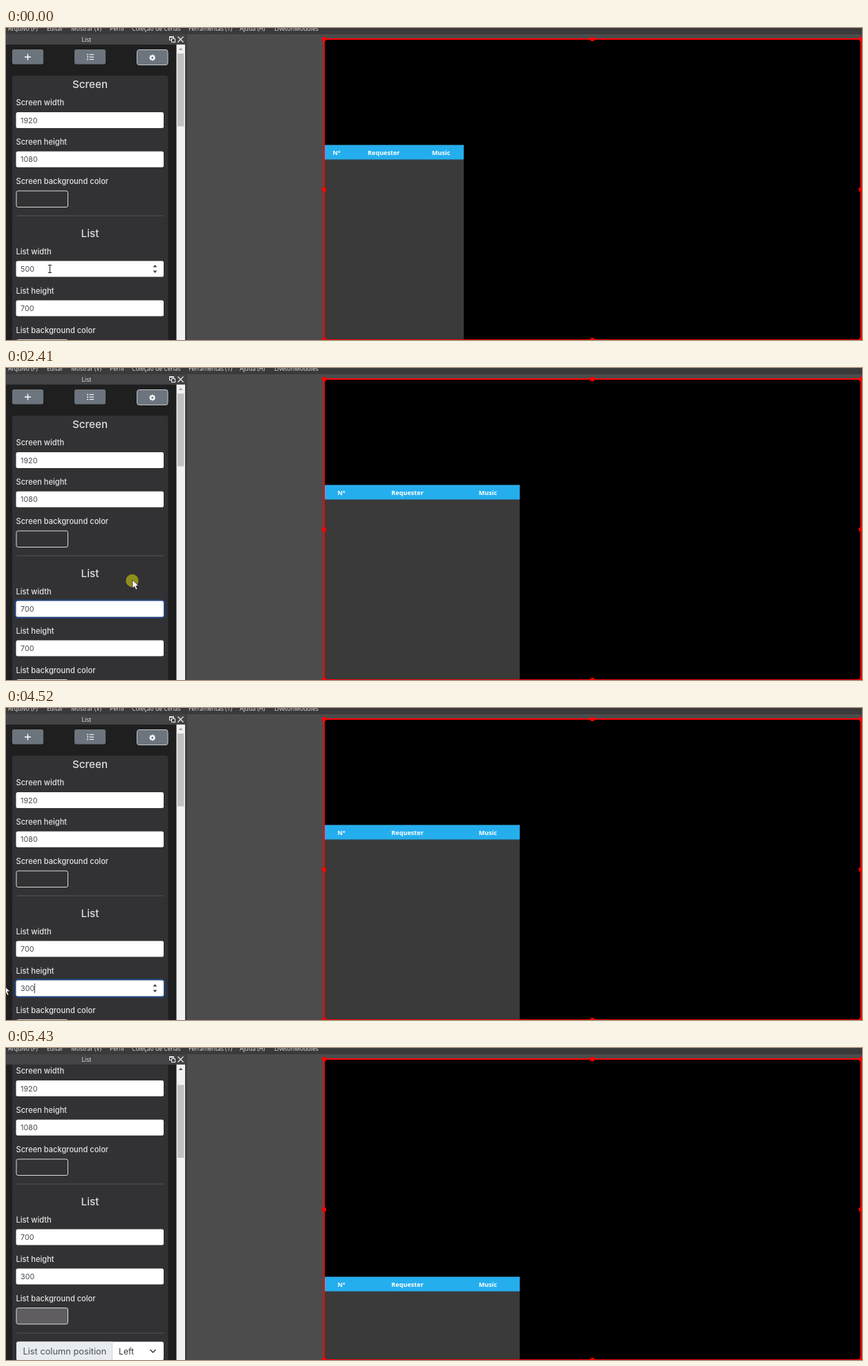
Recreate the animation shown at these times as an HTML page with a canvas. Size 1238 by 452 pixels, loop 5.99 s.

```html
<!DOCTYPE html>
<html lang="pt">
<head>
<meta charset="utf-8">
<style>
html, body { margin: 0; width: 100%; height: 100%; overflow: hidden; background: #1f1f20; }
canvas { display: block; }
</style>
</head>
<body>
<canvas id="stage" width="1238" height="452"></canvas>
<script>
const g = document.getElementById('stage').getContext('2d');
const LOOP = 5990, TICK = 75;
const UI = '"Open Sans", "Noto Sans", sans-serif';
const FORM = 'Inter, "Open Sans", sans-serif';

// Pointer moves, each played in short steps: start, step count, end point
const moves = [
  { at: 90, steps: 4, to: [-3, 350] },
  { at: 2030, steps: 6, to: [183, 307] },
  { at: 2630, steps: 3, to: [188, 302] },
  { at: 2940, steps: 4, to: [75, 403] },
  { at: 3250, steps: 4, to: [9, 406] },
  { at: 3580, steps: 4, to: [-3, 402] },
  { at: 4750, steps: 6, to: [206, 322] }
];
const widthField = {
  y: 337.5, focus: 90, blur: 2480, spinFrom: 0, spinTo: 2105,
  keys: [[0, '500'], [1100, ''], [1250, '7'], [1500, '70'], [1650, '700']]
};
const heightField = {
  y: 394.5, focus: 3410, blur: 5200, spinFrom: 3090, spinTo: 4825,
  keys: [[0, '700'], [3880, ''], [4200, '3'], [4430, '30'], [4520, '300']]
};

const between = (t, a, b) => t >= a && t < b;
const clamp = (v, a, b) => Math.max(a, Math.min(b, v));

function pointerAt(t) {
  let [x, y] = [63, 349];
  for (const { at, steps, to } of moves) {
    if (t < at) break;
    const p = Math.min(1, (Math.floor((t - at) / TICK) + 1) / steps);
    const e = p * p * (3 - 2 * p);
    x += (to[0] - x) * e;
    y += (to[1] - y) * e;
  }
  return [Math.round(x), Math.round(y)];
}

function rect(x, y, w, h, color) {
  g.fillStyle = color;
  g.fillRect(x, y, w, h);
}

function box(x, y, w, h, r, fill, stroke, lineWidth = 1) {
  g.beginPath();
  g.roundRect(x, y, w, h, r);
  if (fill) { g.fillStyle = fill; g.fill(); }
  if (stroke) { g.strokeStyle = stroke; g.lineWidth = lineWidth; g.stroke(); }
}

function disc(x, y, r, color) {
  g.fillStyle = color;
  g.beginPath();
  g.arc(x, y, r, 0, 7);
  g.fill();
}

function lines(color, width, ...paths) {
  g.strokeStyle = color;
  g.lineWidth = width;
  g.beginPath();
  for (const [x, y, ...rest] of paths) {
    g.moveTo(x, y);
    for (let i = 0; i < rest.length; i += 2) g.lineTo(rest[i], rest[i + 1]);
  }
  g.stroke();
}

function shape(color, ...points) {
  g.fillStyle = color;
  g.beginPath();
  for (let i = 0; i < points.length; i += 2) g.lineTo(points[i], points[i + 1]);
  g.closePath();
  g.fill();
}

function text(s, x, y, font, color, align = 'left') {
  g.font = font;
  g.fillStyle = color;
  g.textAlign = align;
  g.fillText(s, x, y);
}

const label = (s, y) => text(s, 14.5, y, `500 11.1px ${FORM}`, '#e4e4e5');
const heading = (s, y) => text(s, 121.5, y, `500 15.2px ${FORM}`, '#dededf', 'center');
const value = (s, y, color = '#444a50') => text(s, 21, y + 15.5, `10.8px ${FORM}`, color);

function staticField(y, s) {
  box(14.5, y, 213.5, 23, 2.5, '#fff');
  value(s, y);
}

function numberField(field, t, pointerX) {
  const { y, focus, blur, keys } = field;
  const focused = between(t, focus, blur);
  const [typedAt, s] = keys.filter(k => k[0] <= t).pop();
  if (focused) {
    g.globalAlpha = clamp((t - focus + TICK) / 150, 0, 1);
    box(13.5, y - 1, 215.5, 25, 3.5, null, '#24477f', 2.4);
    g.globalAlpha = 1;
  }
  staticField(y, s);
  if (focused) {
    const first = typedAt ? s.length : clamp(Math.round((pointerX - 21) / 6.7), 0, s.length);
    const x = 21 + g.measureText(s.slice(0, first)).width;
    if (first < s.length) {
      const end = 21 + g.measureText(s).width;
      rect(x, y + 4, end - x, 15, '#0078d7');
      g.save();
      g.beginPath();
      g.rect(x, y, end - x, 24);
      g.clip();
      value(s, y, '#fff');
      g.restore();
    } else if ((t - typedAt) % 1000 < 500) {
      rect(Math.round(x) + (s ? 0 : 1), y + 4.5, 1, 14, '#444a50');
    }
  }
  if (between(t, field.spinFrom, field.spinTo)) {
    shape('#444', 212.5, y + 9, 215.5, y + 5.5, 218.5, y + 9);
    shape('#444', 212.5, y + 14, 215.5, y + 17.5, 218.5, y + 14);
  }
}

function toolbar() {
  for (const x of [9, 99]) box(x, 31, 45, 21.5, 2.5, '#6c757d');
  box(189.5, 31.5, 44.5, 22, 3, '#6c757d', '#c3c8cd');
  lines('#fff', 1.4, [27, 42, 36, 42], [31.5, 37.5, 31.5, 46.5]);
  for (const y of [38.5, 42, 45.5]) {
    disc(118, y, 0.9, '#fff');
    lines('#fff', 1.1, [120.5, y, 127, y]);
  }
  g.strokeStyle = '#fff';
  g.lineWidth = 2;
  g.beginPath();
  g.arc(211.7, 43, 2.6, 0, 7);
  g.stroke();
  for (let i = 0; i < 8; i++) {
    const a = i * Math.PI / 4, c = Math.cos(a), s = Math.sin(a);
    lines('#fff', 1.5, [211.7 + c * 3, 43 + s * 3, 211.7 + c * 4.5, 43 + s * 4.5]);
  }
}

function form(t, scroll, pointerX) {
  g.save();
  g.beginPath();
  g.rect(0, 24, 246, 428);
  g.clip();
  g.translate(0, -scroll);
  toolbar();
  box(9, 69, 225.5, 600, 4, '#323133');
  heading('Screen', 87);
  label('Screen width', 111.5);
  staticField(122, '1920');
  label('Screen height', 168.5);
  staticField(178.8, '1080');
  label('Screen background color', 225.5);
  box(15, 236, 74.5, 23.5, 2.5, null, '#dcdcdc');
  rect(15, 271.5, 213, 1, '#555456');
  heading('List', 302.5);
  label('List width', 327.5);
  numberField(widthField, t, pointerX);
  label('List height', 384.5);
  numberField(heightField, t, pointerX);
  label('List background color', 441.5);
  box(15, 451.5, 74.5, 23.5, 2.5, '#5f5d60', '#dcdcdc');
  rect(15, 487.5, 213, 1, '#555456');
  box(15, 500.5, 213, 27, 3, '#fff');
  box(15, 500.5, 138.5, 27, [3, 0, 0, 3], '#e9ecef');
  rect(153, 500.5, 1, 27, '#ced4da');
  text('List column position', 24.5, 518.5, `12.8px ${FORM}`, '#495057');
  text('Left', 163, 518.5, `12.2px ${FORM}`, '#343a40');
  lines('#343a40', 1.5, [208.5, 512, 212.5, 516, 216.5, 512]);
  g.restore();
}

function chrome(scroll) {
  rect(0, 0, 1238, 9, '#3a3a3a');
  rect(0, 9, 260, 15, '#444446');
  const menu = [['Arquivo (F)', 3], ['Editar', 59], ['Mostrar (V)', 94], ['Perfil', 150],
    ['Coleção de Cenas', 182], ['Ferramentas (T)', 264], ['Ajuda (H)', 338], ['LivetonModules', 388]];
  for (const [s, x] of menu) text(s, x, 4, `8.6px ${UI}`, '#e6e6e6');
  text('List', 116.5, 20, `8.6px ${UI}`, '#e6e6e6', 'center');
  g.strokeStyle = '#eee';
  g.lineWidth = 1;
  g.strokeRect(236.5, 12.5, 6, 5);
  rect(239, 15, 7, 6, '#444446');
  g.strokeRect(239.5, 15.5, 5, 5);
  rect(236, 12, 7, 2, '#eee');
  lines('#eee', 1.1, [248.5, 12.5, 256.5, 20.5], [256.5, 12.5, 248.5, 20.5]);

  rect(246.5, 24, 12.5, 428, '#f1f1f1');
  shape(scroll ? '#505050' : '#a3a3a3', 249.7, 32, 252.7, 28.8, 255.7, 32);
  rect(248, scroll ? 53.5 : 37, 9.5, 105.5, '#c1c1c1');
}

function preview(t) {
  rect(259, 9, 979, 443, '#4c4c4c');
  rect(259, 9, 3, 443, '#3d3d3e');
  rect(460, 16, 777, 436, '#000');
  const width = t < 2405 ? 201 : 282;
  const top = t < 5125 ? 169.5 : 331.5;
  rect(461, top, width, 452 - top, '#3a3a3a');
  rect(461, top, width, 21, '#25aeee');
  [['Nº', 0.085], ['Requester', 0.424], ['Music', 0.837]].forEach(([s, at]) =>
    text(s, 461 + width * at, top + 14.7, `700 9.1px ${UI}`, '#fff', 'center'));
  g.strokeStyle = '#f00';
  g.lineWidth = 2;
  g.strokeRect(460, 16, 776.5, 436);
  for (const x of [460, 848, 1236.5])
    for (const y of [16, 234, 452])
      if (x !== 848 || y !== 234) disc(x, y, 3.2, '#f00');
}

function pointer(t, x, y) {
  if (t >= 5430) return;
  if (between(t, 2405, 2555) || between(t, 5125, 5270)) disc(x - 0.5, y + 1, 9.2, '#8f8e1c');
  const inField = x > 14 && x < 229 &&
    [widthField, heightField].some(f => y > f.y && y < f.y + 23);
  if (inField) {
    lines('#222', 1, [x + 0.5, y - 5, x + 0.5, y + 5],
      [x - 2, y - 5.5, x + 3, y - 5.5], [x - 2, y + 5.5, x + 3, y + 5.5]);
    return;
  }
  g.save();
  g.translate(x, y);
  shape('#fff', 0, 0, 0, 12, 2.8, 9.5, 5, 14.2, 7, 13.3, 4.9, 8.8, 8.6, 8.6);
  g.strokeStyle = '#111';
  g.lineWidth = 0.6;
  g.stroke();
  g.restore();
}

function draw(now) {
  const t = now % LOOP;
  const scroll = t < 5430 ? 0 : 75;
  const [x, y] = pointerAt(t);
  rect(0, 0, 1238, 452, '#1f1f20');
  preview(t);
  form(t, scroll, x);
  chrome(scroll);
  pointer(t, x, y);
}

const start = performance.now();
function frame() {
  draw(performance.now() - start);
  requestAnimationFrame(frame);
}
frame();
</script>
</body>
</html>
```
